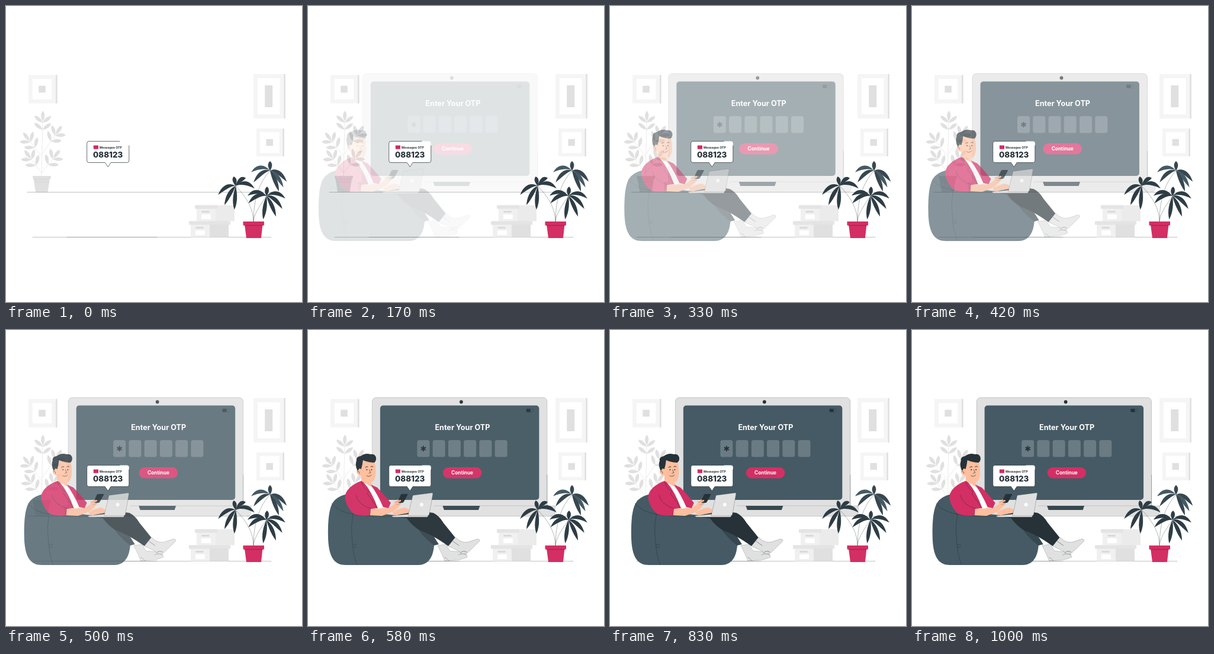
These frames come from a looping animation (500 px wide and 500 px high, 1.04 s). An HTML page:

```html
<!DOCTYPE html>
<html lang="en">
<head>
<meta charset="utf-8">
<title>Enter Your OTP</title>
<style>
  html, body { margin: 0; width: 100%; height: 100%; overflow: hidden; background: #fff; }
  svg { display: block; width: 100vw; height: 100vh; }
  text { font-family: Inter, "Open Sans", sans-serif; font-weight: 700; }
  .line { fill: none; stroke: #263238; stroke-width: .5; stroke-linecap: round; stroke-linejoin: round; }
  .edge { stroke: #263238; stroke-width: .4; stroke-linejoin: round; }
  .ink { fill: #263238; }
  .slate { fill: #455a64; }
  .pink { fill: #d32f64; }
  .skin { fill: #ffbe9d; }
  .grey { fill: #e0e0e0; }
  .pale { fill: #f5f5f5; }
  .white { fill: #fff; }
</style>
</head>
<body>
<svg viewBox="0 0 500 500">
  <g id="pictures"></g>

  <g id="tree"></g>
  <path class="grey" d="M45 287H76L75.500 292H74L70.500 314.500H50L46.500 292H45.500Z"/>
  <path d="M46.500 292.500H74M48 297H73" stroke="#d0d0d0" stroke-width=".6"/>

  <path class="line" d="M36 314.500H460M45 390.500H448" stroke-opacity=".6"/>
  <path class="line" d="M103 390.500H255" stroke-opacity=".5"/>

  <g id="boxes"></g>

  <g id="monitor">
    <path class="grey edge" d="M109.500 298V122Q109.500 114 117.500 114H397Q405 114 405 122V298Z" stroke-opacity=".5"/>
    <path class="line" d="M405 245V297" stroke-opacity=".6"/>
    <rect class="slate" x="123" y="127.500" width="268.500" height="159.500" rx="5"/>
    <circle class="ink" cx="260" cy="121.500" r="2.900"/>
    <path class="grey" d="M102 297H418.500V307Q418.500 314.300 411 314.300H109Q102 314.300 102 307Z"/>
    <path class="line" d="M214 297H418.500V307Q418.500 314.300 411 314.300" stroke-opacity=".35"/>
    <path fill="#37474f" d="M228.500 297H291.500L289 304H231Z"/>
    <rect class="ink" x="370" y="133.300" width="7" height="5.200" rx="1"/>
    <rect x="370" y="133.300" width="11" height="5.200" rx="1.200" class="line" stroke-opacity=".6"/>
    <text class="white" x="262" y="169" font-size="12.600" text-anchor="middle">Enter Your OTP</text>
    <g id="slots" fill="#6a7b83"></g>
    <g id="star" stroke="#263238" stroke-width="2"></g>
    <rect class="pink" x="229" y="232" width="65.500" height="18.500" rx="9.250"/>
    <text class="white" x="261.700" y="243.800" font-size="8.300" text-anchor="middle">Continue</text>
  </g>

  <g id="reader">
    <path class="slate" d="M35 345C35 312 38 294 48 286C56 279 68 276 78 276L122 310L170 315C196 316 215 336 214.500 358C214 378 208 397 187 397H65C46 397 35 385 35 345Z"/>
    <path class="line" d="M41 293Q56 309 78 311Q73 330 75.500 350Q77 382 84 396M75 311Q100 316 150 315M77 363L83 362M77.500 367L83 366"/>

    <g id="legs">
      <path fill="#37474f" d="M178 322L206 338Q215 350 222 362L214 364Q192 348 178 322Z"/>
      <path class="ink" d="M145 315Q182 303 213 309Q223 314 230 326L251 352L238 365Q210 345 191 339Q178 332 168 318Z"/>
      <path class="grey edge" d="M220 364L234 362L241 373L263 375Q270 378 270 384L258 388L232 390Q228 379 220 364Z" stroke-opacity=".5"/>
      <path class="line" d="M232 384Q237 386 239 390M255 380Q262 376 269 380" stroke-opacity=".6"/>
      <path class="grey edge" d="M250 350L256 355Q264 360 272 358L287 353Q292 353 290.500 357L271 376Q265 380 259 377L257 374L238 365Z" stroke-opacity=".6"/>
      <path class="line" d="M246 357L256 364M259 376Q263 372 269 375"/>
    </g>

    <g id="body">
      <path class="skin" d="M91 246L108 252L109 268L112 274L99 264L91 257Z"/>
      <path class="white" d="M95 257L108 265Q120 278 129 299L117 304L105 290Z"/>
      <path class="pink" d="M91 255Q80 259 72 266Q62 275 64 287Q68 302 79 311Q92 315 106 313L107 302L119 301Q109 273 95 257Z"/>
      <path class="pink" d="M107 261L118 266Q128 276 141 292L137 301L128 299Q119 278 107 261Z"/>
      <path class="line" d="M91 256Q94 267 104 273L101 276Q112 290 118 301M82 279Q85 295 108 302M107 302L106 313"/>
      <path class="skin" d="M107 302L137 301L147 294L153 286L159 288L158 294L154 299L145 307L126 314L106 313Z"/>
      <path class="skin" d="M144 308Q155 301 165 300L172 303L171 309L146 313Z"/>
      <path class="ink" d="M153 289L158 278Q159 277 161 277L169 277Q170 277 169 279L163 290Q162 292 160 292L154 292Z"/>
      <path class="skin" d="M147 289L157 287Q160 288 157 290L152 292L158 292Q160 294 156 295L147 298Z"/>
      <path class="line" d="M149 291L157 289M151 295L158 293" stroke-opacity=".5"/>
    </g>

    <g id="head">
      <path class="skin" d="M88 222L112 219Q116 229 115.500 241Q115 256 106 258Q96 258 91 246Q85 246 83 240Q83 234 89 235Z"/>
      <path class="ink" d="M85 238Q80 229 83 221Q82 214 90 213Q98 207 107 210Q114 209 116 215Q117 221 113 224Q104 224 94 220Q93 228 91 235L88 234Z"/>
      <path class="line" d="M98 232Q100 230 102 231M107 231Q109 229 111 231" style="stroke-width:1"/>
      <circle class="ink" cx="100.500" cy="236" r="1"/>
      <circle class="ink" cx="108.500" cy="236" r="1"/>
      <path class="line" d="M104.500 236L107 241L104 242M100 246Q104 249 108 245M85 239Q88 238 88 242" style="stroke-width:.7"/>
    </g>

    <g id="notebook">
      <path class="grey edge" d="M142 314L170 311H205L203 316H145Z" stroke-opacity=".6"/>
      <path class="grey edge" d="M178 280Q178 279 180 279L211 275Q212 275 212 277L206 311Q205 314 202 314H170Z" stroke-opacity=".7"/>
      <circle class="white" cx="193" cy="295" r="2.900"/>
    </g>
  </g>

  <g id="palm"></g>
  <path class="pink" d="M403 369H433.500L431 392H406ZM400.500 364H436V370.500H400.500Z"/>
  <path class="line" d="M402.500 370.700H434"/>

  <g id="bubble">
    <path class="white" d="M140 228.500H204.500Q207.800 228.500 207.800 232V261Q207.800 264.500 204.500 264.500H177L172.300 271.800L167.300 264.500H140Q136.700 264.500 136.700 261V232Q136.700 228.500 140 228.500Z"/>
    <path class="line" d="M192 228.500H140Q136.700 228.500 136.700 232V261Q136.700 264.500 140 264.500H167.300L172.300 271.800L177 264.500H204.500Q207.800 264.500 207.800 261V236" style="stroke-width:.7"/>
    <rect class="pink" x="147.800" y="235.500" width="8.200" height="6.200" rx=".8"/>
    <path d="M148 236L152 239.300L156 236" fill="none" stroke="#a8244f" stroke-width=".5"/>
    <text class="ink" x="158" y="240.900" font-size="5.200">Messages OTP</text>
    <text class="ink" x="172.200" y="255.800" font-size="13.400" text-anchor="middle" style="font-weight:800">088123</text>
  </g>
</svg>

<script>
const $ = id => document.getElementById(id);
const range = n => [...Array(n).keys()];
const rad = deg => deg * Math.PI / 180;
const rect = (x, y, w, h, fill) =>
  `<rect x="${x}" y="${y}" width="${w}" height="${h}" fill="${fill}"/>`;

// Pointed leaf, widest past the middle; arch lifts its spine.
function leaf(x, y, dx, dy, width, arch, fill) {
  const len = Math.hypot(dx, dy);
  const at = (k, w) => `${x + dx * k - dy / len * w} ${y + dy * k + dx / len * w - arch}`;
  const tip = `${x + dx} ${y + dy}`;
  return `<path fill="${fill}" d="M${x} ${y}C${at(.3, width * .6)} ${at(.7, width)} ${tip}` +
    `C${at(.7, -width)} ${at(.3, -width * .6)} ${x} ${y}Z"/>`;
}

// Picture frame with a centred block
function picture(x, y, w, h, inset, blockW, blockH) {
  const face = w - 2.5;
  return rect(x, y, w, h, '#f5f5f5') + rect(x + face, y, 2.5, h, '#e0e0e0') +
    rect(x + inset, y + inset, face - 2 * inset, h - 2 * inset, '#fff') +
    rect(x + (face - blockW) / 2, y + (h - blockH) / 2, blockW, blockH, '#e0e0e0');
}

function carton(x, y, lid, side) {
  return rect(x + 35, y, 32, 27, side) + rect(x + 3, y, 32, 27, '#f0f0f0') +
    rect(x, y, lid, 6, '#e4e4e4') + rect(x + 11.5, y + 9.5, 13, 3, '#dadada') +
    rect(x + 11, y + 15.5, 16, 8, '#fff');
}

// Twig with a leaf at its end and pairs of leaves behind it
function twig(x, y, ex, ey) {
  const dir = Math.atan2(ey - y, ex - x);
  const grow = (back, turn) => {
    const a = dir + rad(turn);
    return leaf(ex - back * Math.cos(dir), ey - back * Math.sin(dir),
      18 * Math.cos(a), 18 * Math.sin(a), 5, 0, '#e0e0e0');
  };
  return `<path d="M${x} ${y}L${ex} ${ey}" stroke="#e6e6e6" stroke-width=".8"/>` +
    grow(0, 0) + [2, 14].map(b => grow(b, -52) + grow(b, 52)).join('');
}

// Crown of drooping leaves; each fan is [first angle, last angle, count].
function crown(x, y, light, fans) {
  const stem = `<path class="line" d="M418 364Q418 ${y + 30} ${x} ${y}" stroke-opacity=".7"/>`;
  return stem + fans.map(([from, to, count]) => range(count).map(i => {
    const a = rad(from + (to - from) * i / Math.max(1, count - 1));
    const dx = 32 * Math.cos(a), dy = Math.sin(a) * (Math.sin(a) > 0 ? 40 : 16);
    return leaf(x, y, dx, dy, 5.5, Math.abs(dx) * .28, light && i % 2 ? '#455a64' : light ? '#37474f' : '#2e3d45');
  }).join('')).join('');
}

$('pictures').innerHTML = picture(38, 116.5, 48.5, 48, 6.8, 11.5, 11.5) +
  picture(418, 115, 54, 75, 7, 13, 37) + picture(423, 207, 47, 47, 5.7, 11.5, 11.5);

$('boxes').innerHTML = carton(319, 336.5, 38, '#ebebeb') + carton(309, 363.5, 70, '#e0e0e0');

$('tree').innerHTML = twig(60, 287, 62, 195) + twig(60, 254, 40, 228) +
  twig(60, 282, 42, 258) + twig(61, 250, 84, 217) + twig(60, 282, 80, 257);

$('palm').innerHTML =
  crown(446, 278, true, [[150, 176, 2], [28, 62, 3], [270, 270, 1]]) +
  crown(388, 304, false, [[94, 158, 3], [-58, 6, 2], [264, 264, 1]]) +
  crown(440, 321, false, [[100, 100, 1], [162, 182, 2], [6, 60, 3], [272, 272, 1]]);

$('slots').innerHTML = range(6)
  .map(i => `<rect x="${185.5 + i * 26.25}" y="186" width="21" height="28.5" rx="3.5"/>`).join('');
$('star').innerHTML = range(3)
  .map(i => `<path d="M196 195.7V205" transform="rotate(${i * 60} 196 200.4)"/>`).join('');

const LOOP = 1040, FPS = 24, SETTLE = 14.5, REST = -0.4;
const start = performance.now();

function draw() {
  const t = (performance.now() - start) % LOOP;
  const n = Math.floor(t * FPS / 1000 + 0.1);
  const p = Math.min(1, Math.max(0, (n - 1.95) * 0.08));
  // Slide in linearly, drift slightly past, then come to rest.
  const drift = 1.3 * Math.sin(Math.PI * Math.min(1, (n - SETTLE) / 9.5));
  const x = REST + (n < SETTLE ? -20 * (1 - p) : drift);
  for (const id of ['monitor', 'reader']) {
    $(id).setAttribute('opacity', p.toFixed(3));
    $(id).setAttribute('transform', `translate(${x.toFixed(2)} 0)`);
  }
  requestAnimationFrame(draw);
}
draw();
</script>
</body>
</html>
```
